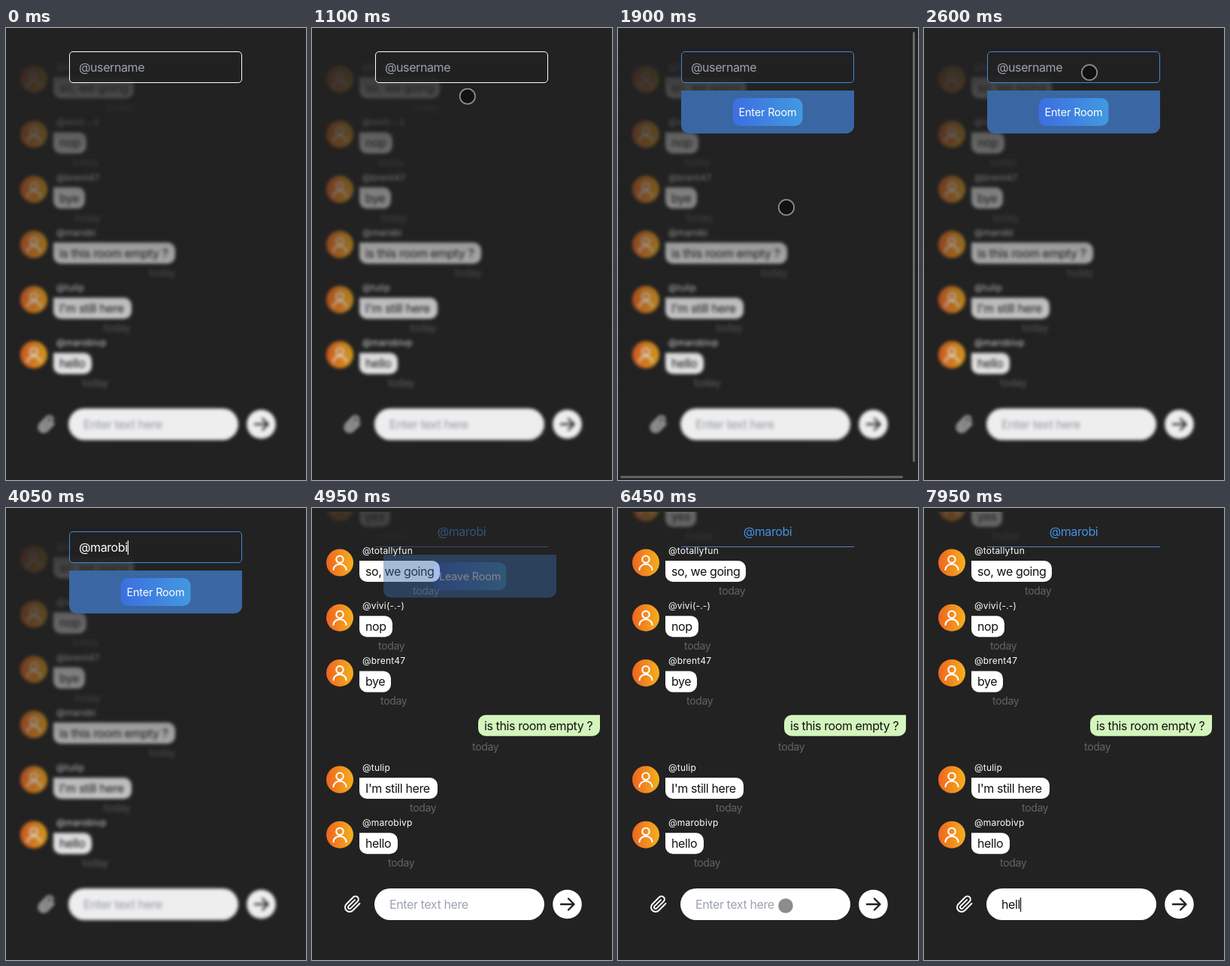
Recreate the animation shown at these times as an HTML page. Size 399 by 600 pixels, loop 8000 ms.

```html
<!DOCTYPE html>
<html lang="en">
<head>
<meta charset="utf-8">
<title>Chat room</title>
<style>
html, body { margin: 0; height: 100%; overflow: hidden; background: #222; }
svg { display: block; width: 399px; height: 600px; font-family: Inter, "Open Sans", sans-serif; }
.body { font-size: 16px; letter-spacing: -.4px; }
.name { font-size: 12px; letter-spacing: .2px; fill: #fff; }
.day { font-size: 14px; letter-spacing: -.3px; fill: #646464; }
.btn { font-size: 14.4px; letter-spacing: -.15px; fill: #fff; text-anchor: middle; }
.hint { fill: #9ca3af; }
.line { fill: none; stroke-linecap: round; stroke-linejoin: round; }
.blur { filter: blur(2.1px); }
</style>
</head>
<body>
<svg viewBox="0 0 399 600">
  <defs>
    <linearGradient id="sun"><stop stop-color="#ee6420"/><stop offset="1" stop-color="#f5b01e"/></linearGradient>
    <linearGradient id="sky"><stop stop-color="#3d6ee0"/><stop offset="1" stop-color="#4299e1"/></linearGradient>
    <linearGradient id="fade" x2="0" y2="1">
      <stop stop-color="#222"/><stop offset=".8" stop-color="#222" stop-opacity=".08"/>
      <stop offset="1" stop-color="#222" stop-opacity=".08"/>
    </linearGradient>
    <g id="face">
      <circle r="18" fill="url(#sun)"/>
      <g class="line" stroke="#fff" stroke-width="2.1">
        <circle cy="-4.3" r="4.7"/><path d="M-8.5 9.5a8.5 7.5 0 0 1 17 0"/>
      </g>
    </g>
    <g id="bar">
      <path class="line" stroke="#fff" stroke-width="2" transform="translate(42 514)" d="M21.44 11.05l-9.19 9.19a6 6 0 0 1-8.49-8.49l9.19-9.19a4 4 0 0 1 5.66 5.66l-9.2 9.19a2 2 0 0 1-2.83-2.83l8.49-8.48"/>
      <rect x="83" y="505" width="226" height="42" rx="21" fill="#fff"/>
      <circle cx="339.5" cy="526" r="19.3" fill="#fff"/>
      <path class="line" stroke="#222" stroke-width="2.4" d="M331 526h17.5m-7.5-7.5l7.5 7.5-7.5 7.5"/>
    </g>
  </defs>
  <rect width="399" height="600" fill="#222"/>

  <g id="lobby">
    <g class="blur">
      <g id="oldRows"></g>
      <use href="#bar"/>
      <text class="body hint" x="103" y="532">Enter text here</text>
    </g>
    <rect width="399" height="600" fill="url(#fade)"/>
    <rect id="field" x="84.5" y="31.5" width="229" height="41" rx="4.5" fill="#222" fill-opacity=".85"/>
    <text id="user" class="body" x="97" y="58"></text>
    <rect id="userCaret" y="43" width="1.2" height="19" fill="#fff"/>
  </g>

  <g id="room">
    <g id="rows"></g>
    <use href="#bar"/>
    <text id="msg" class="body" x="103" y="532"></text>
    <rect id="msgCaret" y="517" width="1.2" height="19" fill="#111"/>
    <g id="head">
      <g id="topRow" class="blur" opacity=".3"></g>
      <rect width="399" height="5" fill="#222"/>
      <path d="M84 51.5H314" stroke="#4a86c4"/>
      <text class="body" x="199" y="37" fill="#4291e1" text-anchor="middle">@marobi</text>
    </g>
  </g>

  <g id="panel">
    <path d="M84 0H314V47a10 10 0 0 1-10 10H94a10 10 0 0 1-10-10z" fill="#3a67a3"/>
    <rect id="button" y="10" height="37" rx="10" fill="url(#sky)"/>
    <text id="label" class="btn" x="199" y="34"></text>
  </g>

  <g id="bars" fill="#666">
    <rect x="392" y="5" width="3" height="571" rx="1.5"/>
    <rect x="3" y="594.5" width="376" height="3" rx="1.5"/>
  </g>
  <circle id="dot" r="10.2" fill="#000" fill-opacity=".45" stroke="#8c8c8c" stroke-width="1.8"/>
</svg>
<script>
const $ = id => document.getElementById(id);
const set = (id, attrs) => { for (const k in attrs) $(id).setAttribute(k, attrs[k]); };
const clamp = v => Math.min(1, Math.max(0, v));
const show = (id, on) => set(id, { visibility: on ? 'visible' : 'hidden' });

// name, message, bubble width, x of the date
const chat = [
  ['@totallyfun', 'so, we going', 107, 134],
  ['@vivi(-.-)', 'nop', 44, 88],
  ['@brent47', 'bye', 42, 91],
  ['@marobi', 'is this room empty ?', 162, 190],
  ['@tulip', "I'm still here", 104, 130],
  ['@marobivp', 'hello', 51, 101]
];

function row([name, text, w, dayX], y) {
  return `<use href="#face" x="37" y="${y + 2.5}"/>
    <text class="name" x="67" y="${y - 9}">${name}</text>
    <path d="M63 ${y}h${w - 10}a10 10 0 0 1 10 10v8a10 10 0 0 1-10 10H73a10 10 0 0 1-10-10z" fill="#fff"/>
    <text class="body" x="71" y="${y + 20}" fill="#111">${text}</text>
    <text class="day" x="${dayX}" y="${y + 45}">today</text>`;
}
const ownRow = y => `<path d="M383 ${y}H231a10 10 0 0 0-10 10v8a10 10 0 0 0 10 10h142a10 10 0 0 0 10-10z" fill="#d4f5bd"/>
  <text class="body" x="229" y="${y + 20}" fill="#111">${chat[3][1]}</text>
  <text class="day" x="213" y="${y + 47}">today</text>`;

const rowY = i => 65.2 + 73.2 * i;
$('oldRows').innerHTML = chat.map((c, i) => row(c, rowY(i))).join('');
$('rows').innerHTML = chat.map((c, i) => i == 3 ? ownRow(274.7) : row(c, rowY(i) + (i < 3 ? 4.8 : 0))).join('');
$('topRow').innerHTML = row(['', 'yes', 41, 91], -3);

const userKeys = [3450, 3550, 3700, 3750, 3850, 3900, 4050];
const msgKeys = [7650, 7800, 7900, 7950];
// time, x, y
const visit1 = [[550, 39, 612], [1200, 218, 56], [1350, 220, 58], [1550, 224, 246], [1850, 224, 246], [2250, 222, 70], [2600, 220, 59]];
const visit2 = [[5500, 220, 59], [6050, 235, 552], [6300, 235, 552], [6430, 223, 528]];

function along(path, t) {
  let i = path.findIndex(p => p[0] > t);
  if (i < 0) return path[path.length - 1].slice(1);
  if (!i) return path[0].slice(1);
  const [a, b] = [path[i - 1], path[i]], p = (t - a[0]) / (b[0] - a[0]), e = p * p * (3 - 2 * p);
  return [a[1] + (b[1] - a[1]) * e, a[2] + (b[2] - a[2]) * e];
}

function typed(id, keys, word, hint, ink, t, blink) {
  const n = keys.filter(k => t >= k).length, el = $(id);
  el.textContent = n ? word.slice(0, n) : hint;
  el.setAttribute('fill', n ? ink : '#9ca3af');
  const x = +el.getAttribute('x') + (n ? el.getComputedTextLength() : 0);
  set(id + 'Caret', { x, opacity: n || blink ? 1 : 0 });
}

const enter = (t, start) => 1 - (1 - clamp((t - start) / 300)) ** 1.9;

function draw(t) {
  const inRoom = t >= 4400;
  show('lobby', !inRoom);
  show('room', inRoom);

  set('field', { stroke: t < 1250 ? '#fff' : '#4289dc' });
  typed('user', userKeys, '@marobi', '@username', '#fff', t, t >= 2950);
  typed('msg', msgKeys, 'hell', 'Enter text here', '#111', t, t >= 6550 && t < 7150);

  const leave = clamp((t - 5500) / 550) ** 1.5;
  const open = inRoom ? enter(t, 4870) * (1 - leave) : enter(t, 1470);
  set('panel', { transform: `translate(${20 * (1 - open)} ${inRoom ? 62 : 83})`, opacity: open });
  set('button', inRoom ? { x: 150.5, width: 97 } : { x: 152.5, width: 93 });
  $('label').textContent = inRoom ? 'Leave Room' : 'Enter Room';
  set('head', { opacity: enter(t, 4870) });

  const bars = t < 1500 ? 0 : t < 2200 ? clamp((2200 - t) / 250) : t >= 5000 && t < 5150 ? .5 : 0;
  set('bars', { opacity: bars });

  const second = t >= 5500;
  const [x, y] = along(second ? visit2 : visit1, t);
  show('dot', second ? t < 7650 : t >= 550 && t < 3450);
  set('dot', { transform: `translate(${x} ${y}) scale(${t >= 6400 ? .88 : 1})` });
}

const start = performance.now();
function tick() {
  draw((performance.now() - start) % 8000);
  requestAnimationFrame(tick);
}
tick();
</script>
</body>
</html>
```
